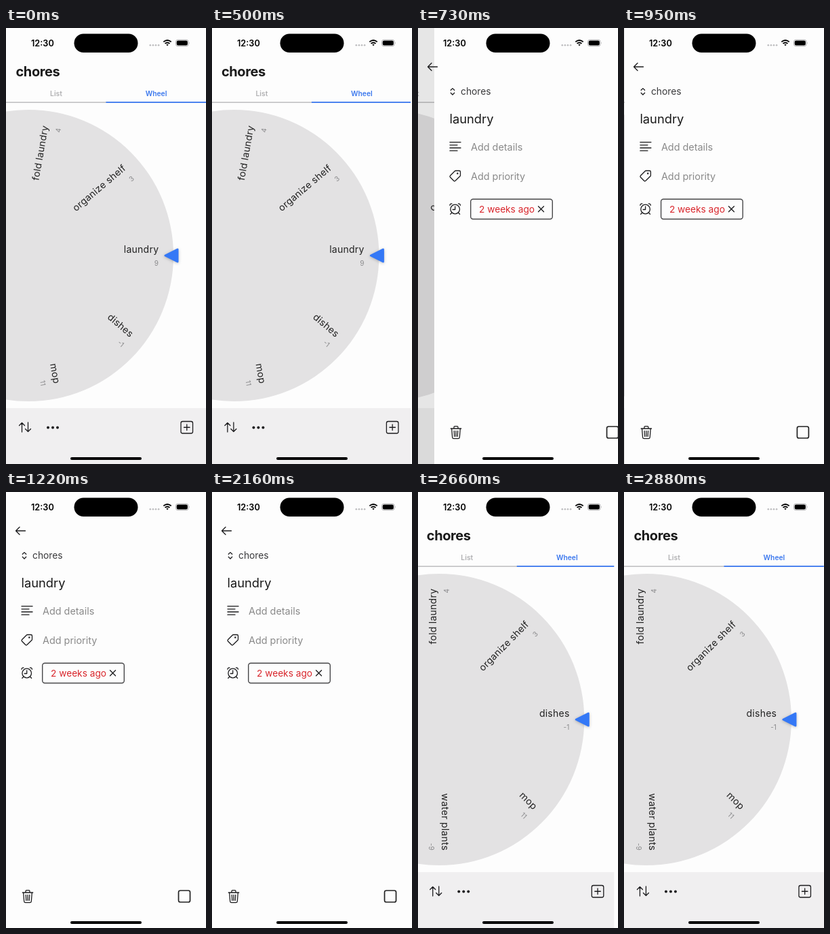
An HTML page for the animation above (6350 ms loop, 295 by 640 pixels).

```html
<!DOCTYPE html>
<html lang="en">
<head>
<meta charset="utf-8">
<title>Chore wheel</title>
<style>
  html, body { margin: 0; width: 100%; height: 100%; overflow: hidden; background: #fdfdfd; }
  svg { display: block; width: 100%; height: 100%; font-family: Inter, Roboto, sans-serif; }
  .icon { fill: none; stroke: #1c1c1e; stroke-width: 1.3; stroke-linecap: round; stroke-linejoin: round; }
  .tab { font-size: 10.3px; font-weight: 600; text-anchor: middle; }
  .chore { font-size: 14px; letter-spacing: .25px; fill: #222; text-anchor: end; }
  .score { font-size: 10px; fill: #8a8a8c; text-anchor: end; }
  .hint { font-size: 14.4px; fill: #8a8a8a; }
  #marker { filter: drop-shadow(0 1px 2px rgba(0, 0, 0, .25)); }
</style>
</head>
<body>
<svg viewBox="0 0 295 640">
  <g id="home">
    <rect width="295" height="640" fill="#fdfdfd"/>
    <text x="14.5" y="71" font-size="20" font-weight="700" letter-spacing="-.4" fill="#1a1a1a">chores</text>
    <text class="tab" x="74" y="100" fill="#b0b0b2">List</text>
    <text class="tab" x="221.5" y="100" fill="#3b78ee">Wheel</text>
    <rect y="108.5" width="148" height="1.3" fill="#b4b4b6"/>
    <rect x="147.5" y="108.2" width="147.5" height="1.8" fill="#3b78ee"/>
    <circle cx="33" cy="334" r="214" fill="#e3e2e3"/>
    <g id="wheels"></g>
    <path id="marker" d="M235 334L253 325V343Z" fill="#3478f6" stroke="#3478f6" stroke-width="3" stroke-linejoin="round"/>
    <rect y="558" width="295" height="82" fill="#f0eff0"/>
    <path class="icon" d="M23.5 593V579.5M19.5 583.5l4-4 4 4M32.5 579v13.5M28.5 588.500l4 4 4-4"/>
    <g fill="#1c1c1e">
      <circle cx="62" cy="586.500" r="2"/><circle cx="69" cy="586.500" r="2"/><circle cx="76" cy="586.500" r="2"/>
    </g>
    <g class="icon" stroke-width="1.5">
      <rect x="258" y="577.500" width="17.500" height="17.500" rx="2.500"/>
      <path d="M262.500 586.250h8.500M266.750 582v8.500"/>
    </g>
  </g>

  <rect id="dim" width="295" height="640"/>

  <g id="sheet">
    <rect width="295" height="640" fill="#fdfdfd"/>
    <path class="icon" d="M24.300 91.300l2.700-2.700 2.700 2.700M24.300 95.300l2.700 2.700 2.700-2.700"/>
    <text x="39" y="98" font-size="13.8" fill="#3a3a3c">chores</text>
    <text x="22.500" y="140" font-size="18.3" fill="#1a1a1a">laundry</text>
    <path class="icon" d="M23 167.700H39M23 171.800H34M23 176H39M23 180.200H34"/>
    <text class="hint" x="54" y="179.500">Add details</text>
    <g class="icon">
      <path d="M31.500 209.500H36.800Q38.500 209.500 38.500 211.200V216.300Q38.500 217 38 217.500L31 224.300Q29.800 225.300 28.700 224.300L23.500 219Q22.500 218 23.500 216.800L30.300 210Q30.800 209.500 31.500 209.500Z"/>
      <circle cx="34.300" cy="213.600" r=".6"/>
    </g>
    <text class="hint" x="54" y="222.500">Add priority</text>
    <g class="icon">
      <circle cx="30.700" cy="266" r="6.800"/>
      <path d="M30.700 261.800V266.500H27.200M23 260.300Q23 257.700 26 257.900M38.400 260.300Q38.400 257.700 35.400 257.900M25.800 271.300l-2 2M35.600 271.300l2 2"/>
    </g>
    <rect x="53.700" y="251.300" width="120.600" height="29.200" rx="3.500" fill="none" stroke="#48484a" stroke-width="1.400"/>
    <text x="66" y="270.500" font-size="13.7" fill="#d9262c">2 weeks ago</text>
    <path class="icon" d="M153.500 261.700l8 8M161.500 261.700l-8 8"/>
    <path class="icon" d="M24.300 588H39.700M29 587.500V586Q29 584.700 30.300 584.700H33.700Q35 584.700 35 586V587.500M25.700 588.500L26.700 601Q26.900 602.700 28.500 602.700H35.500Q37.100 602.700 37.300 601L38.300 588.500M29.300 591.500L29.700 599.500M32 591.500V599.500M34.700 591.500L34.300 599.500"/>
    <rect x="254.500" y="585" width="17" height="17" rx="2.500" fill="none" stroke="#222" stroke-width="1.700"/>
  </g>

  <path id="back" class="icon" d="M28.500 57H14.500M20 51.500L14.500 57 20 62.500"/>

  <text x="37" y="26.600" font-size="12.7" font-weight="600">12:30</text>
  <rect x="100.500" y="8.500" width="94" height="27.500" rx="13.750"/>
  <g fill="#bcbcbe">
    <circle cx="212.800" cy="25.300" r="1.300"/><circle cx="216.900" cy="25.300" r="1.300"/>
    <circle cx="221" cy="25.300" r="1.300"/><circle cx="225.100" cy="25.300" r="1.300"/>
  </g>
  <g fill="none" stroke="#000" stroke-width="1.900">
    <path d="M232.300 20.400Q238 15.400 243.700 20.400M234.500 22.900Q238 19.900 241.500 22.900"/>
    <path d="M236.300 24.500Q238 23.200 239.700 24.500L238 26.300Z" fill="#000" stroke="none"/>
  </g>
  <rect x="250.500" y="17.300" width="18.500" height="9.400" rx="2.900" fill="none" stroke="#a5a5a7" stroke-width=".9"/>
  <rect x="251.700" y="18.500" width="16.100" height="7" rx="1.900"/>
  <path d="M270.200 20.500q1.200 1.500 0 3z" fill="#a5a5a7"/>
  <rect x="95" y="630" width="105" height="4" rx="2"/>
</svg>
<script>
const byId = id => document.getElementById(id);
const WIDTH = 295, LOOP = 6350, SPRING = 0.0175;
const OPEN_AT = 493, CLOSE_AT = 2325, DONE_AT = 2000;
// The picture holds still between these moments.
const HOLDS = [0, 500, 620, 730, 840, 950, 1220, 2330, 2440, 2550, 2660, 2770, 2880];

const before = [["fold laundry", 4], ["organize shelf", 3], ["laundry", 9], ["dishes", -1], ["mop", 11], ["water plants", -9]];
const after = before.filter(([name]) => name !== "laundry");

// The third chore faces the marker; the rest fan out around the hub.
function wheel(chores, slots) {
  const labels = chores.map(([name, score], i) =>
    `<g transform="translate(33 334) rotate(${(i - 2) * 360 / slots})">
      <text class="chore" x="192.300" y="-4">${name}</text>
      <text class="score" x="192" y="15">${score}</text>
    </g>`);
  return `<g>${labels.join("")}</g>`;
}
byId("wheels").innerHTML = wheel(before, 9) + wheel(after, 8);
const [wheelBefore, wheelAfter] = byId("wheels").children;

// Critically damped spring from 0 to 1.
function spring(elapsed) {
  const u = Math.max(0, elapsed) * SPRING;
  return 1 - (1 + u) * Math.exp(-u);
}

const clamp = v => Math.min(1, Math.max(0, v));

function render(time) {
  const t = HOLDS.findLast(hold => hold <= time);
  const shown = t < DONE_AT ? spring(t - OPEN_AT) : 1 - spring(t - CLOSE_AT);
  const done = t >= DONE_AT;
  byId("home").setAttribute("transform", `translate(${-0.3 * WIDTH * shown} 0)`);
  byId("sheet").setAttribute("transform", `translate(${WIDTH * (1 - shown)} 0)`);
  byId("dim").setAttribute("opacity", 0.1 * shown);
  byId("back").setAttribute("opacity", clamp((shown - 0.42) / 0.2));
  wheelBefore.setAttribute("visibility", done ? "hidden" : "visible");
  wheelAfter.setAttribute("visibility", done ? "visible" : "hidden");
}

const start = performance.now();
function tick() {
  render((performance.now() - start) % LOOP);
  requestAnimationFrame(tick);
}
tick();
</script>
</body>
</html>
```
